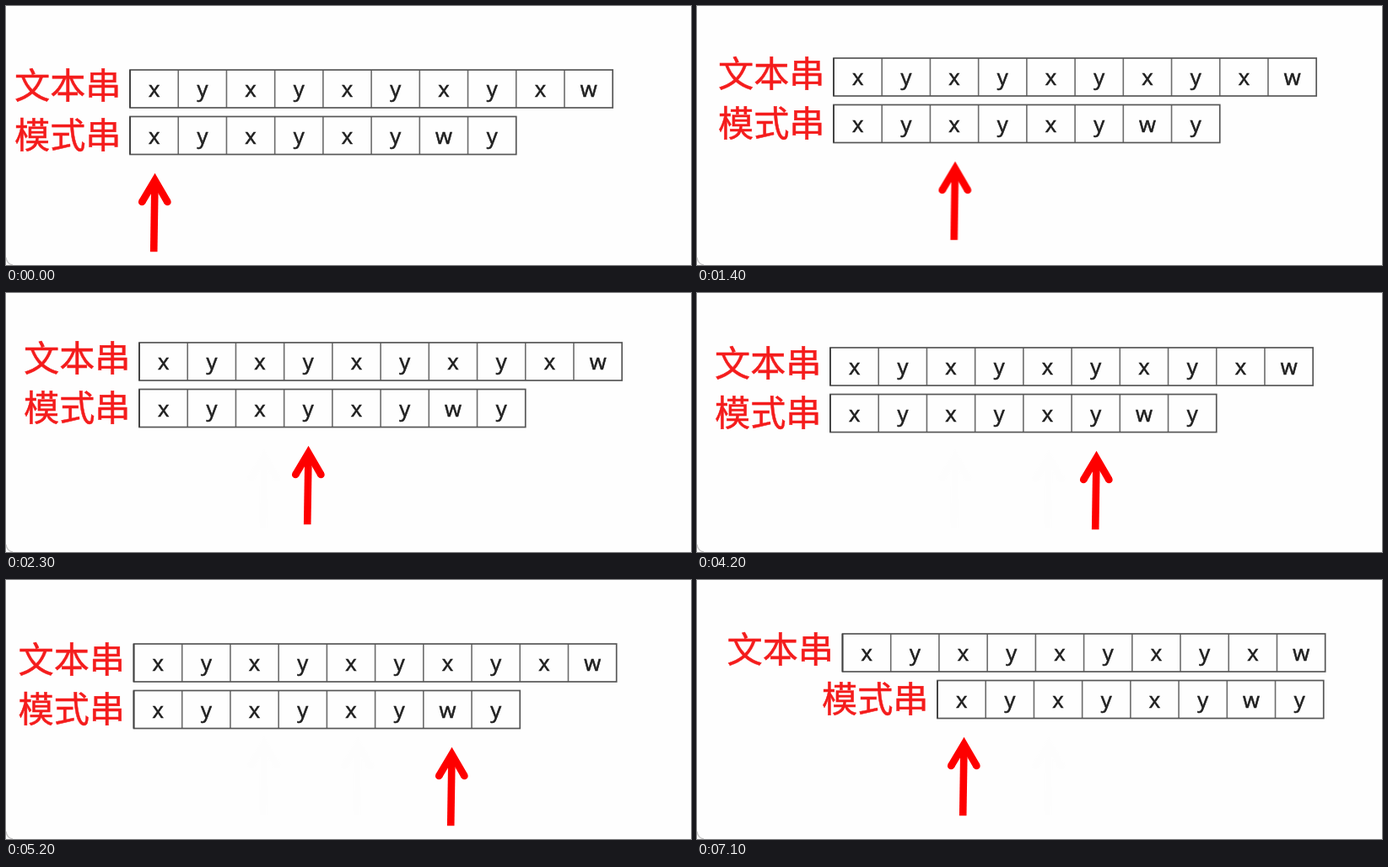
An HTML page that plays this animation: 812 px wide and 308 px high, repeating every 8000 ms.

```html
<!DOCTYPE html>
<html lang="zh-CN">
<head>
<meta charset="utf-8">
<title>String matching</title>
<style>
html, body { margin: 0; width: 100%; height: 100%; overflow: hidden; background: #fefefe; }
svg { display: block; width: 812px; height: 308px; }
.label { font: 400 42.2px "Noto Sans CJK SC", "Noto Sans CJK", sans-serif; fill: #f41c1c; stroke: #f41c1c; stroke-width: .5; }
.cell { font: 400 25.6px "Open Sans", "Noto Sans", sans-serif; fill: #202020; stroke: #202020; stroke-width: .6; text-anchor: middle; }
.grid { fill: none; stroke: #565656; stroke-width: 1.7; }
.bars { fill: none; stroke: #6c6c6c; stroke-width: 1.6; }
.edge { stroke: #404040; stroke-width: 1.8; }
.arrow { fill: none; stroke: #fe0000; stroke-width: 8.6; }
.ghost { stroke: #fdfdfd; }
#board, #pattern, #pointer, .ghost { animation: 8s step-end infinite; }
#board { animation-name: drift; }
#pattern { animation-name: shift; }
#pointer { animation-name: point; }
#ghostA { animation-name: ghostA; }
#ghostB { animation-name: ghostB; }

/* whole picture jitters from step to step */
@keyframes drift {
  0%     { transform: translate(0, 0); }
  6.25%  { transform: translate(6px, 5px); }
  17.5%  { transform: translate(15px, -14px); }
  28.75% { transform: translate(11px, -17px); }
  41.25% { transform: translate(15px, -10.5px); }
  52.5%  { transform: translate(11px, -11px); }
  65%    { transform: translate(4.5px, 0); }
  77.5%  { transform: translate(10.5px, -4.5px); }
  88.75%, 100% { transform: translate(25.5px, -12px); }
}
@keyframes shift {
  0%     { transform: translateX(0); }
  77.5%  { transform: translateX(57px); }
  88.75%, 100% { transform: translateX(112.5px); }
}
@keyframes point {
  0%     { transform: translateX(0); }
  6.25%  { transform: translateX(57px); }
  17.5%  { transform: translateX(114.5px); }
  28.75% { transform: translateX(171px); }
  41.25% { transform: translateX(226.5px); }
  52.5%  { transform: translateX(286px); }
  65%    { transform: translateX(347.5px); }
  77.5%  { transform: translateX(57.5px); }
  88.75%, 100% { transform: translateX(114.5px); }
}
@keyframes ghostA {
  0%     { opacity: 0; }
  28.75% { opacity: 1; }
  88.75%, 100% { opacity: 0; }
}
@keyframes ghostB {
  0%     { opacity: 0; }
  52.5%, 100% { opacity: 1; }
}
</style>
</head>
<body>
<svg viewBox="0 0 812 308">
  <defs>
    <g id="shape">
      <path d="M176.5 208L175.2 292.3"/>
      <path d="M161.2 233L176.5 207.2L191.4 233" stroke-miterlimit="6"/>
      <path d="M161.2 233h.01M191.4 233h.01" stroke-linecap="round"/>
    </g>
  </defs>
  <path d="M0 299Q1 306.5 8 308" fill="none" stroke="#c6c6c6" stroke-width="1.3"/>
  <g transform="translate(129.5 -13)"><use id="ghostA" class="arrow ghost" href="#shape"/></g>
  <g transform="translate(240.5 -12)"><use id="ghostB" class="arrow ghost" href="#shape"/></g>
  <g id="board">
    <g id="text"></g>
    <g id="pattern"></g>
    <use id="pointer" class="arrow" href="#shape"/>
  </g>
</svg>
<script>
const LEFT = 147, HEIGHT = 45, STEP = 57.22;

function drawRow(id, label, letters, top, labelY) {
  const chars = [...letters];
  const bars = chars.slice(1).map((_, i) => `M${LEFT + STEP * (i + 1)} ${top}v${HEIGHT}`).join('');
  const cells = chars.map((c, i) =>
    `<text class="cell" x="${LEFT + STEP * (i + .5)}" y="${top + 32.4}">${c}</text>`).join('');
  document.getElementById(id).innerHTML =
    `<text class="label" x="10" y="${labelY}">${label}</text>
     <path class="bars" d="${bars}"/>
     <rect class="grid" x="${LEFT}" y="${top}" width="${STEP * chars.length}" height="${HEIGHT}"/>
     <path class="edge" d="M${LEFT} ${top}v${HEIGHT}"/>${cells}`;
}

drawRow('text', '文本串', 'xyxyxyxyxw', 76, 110);
drawRow('pattern', '模式串', 'xyxyxywy', 131.5, 169);
</script>
</body>
</html>
```
